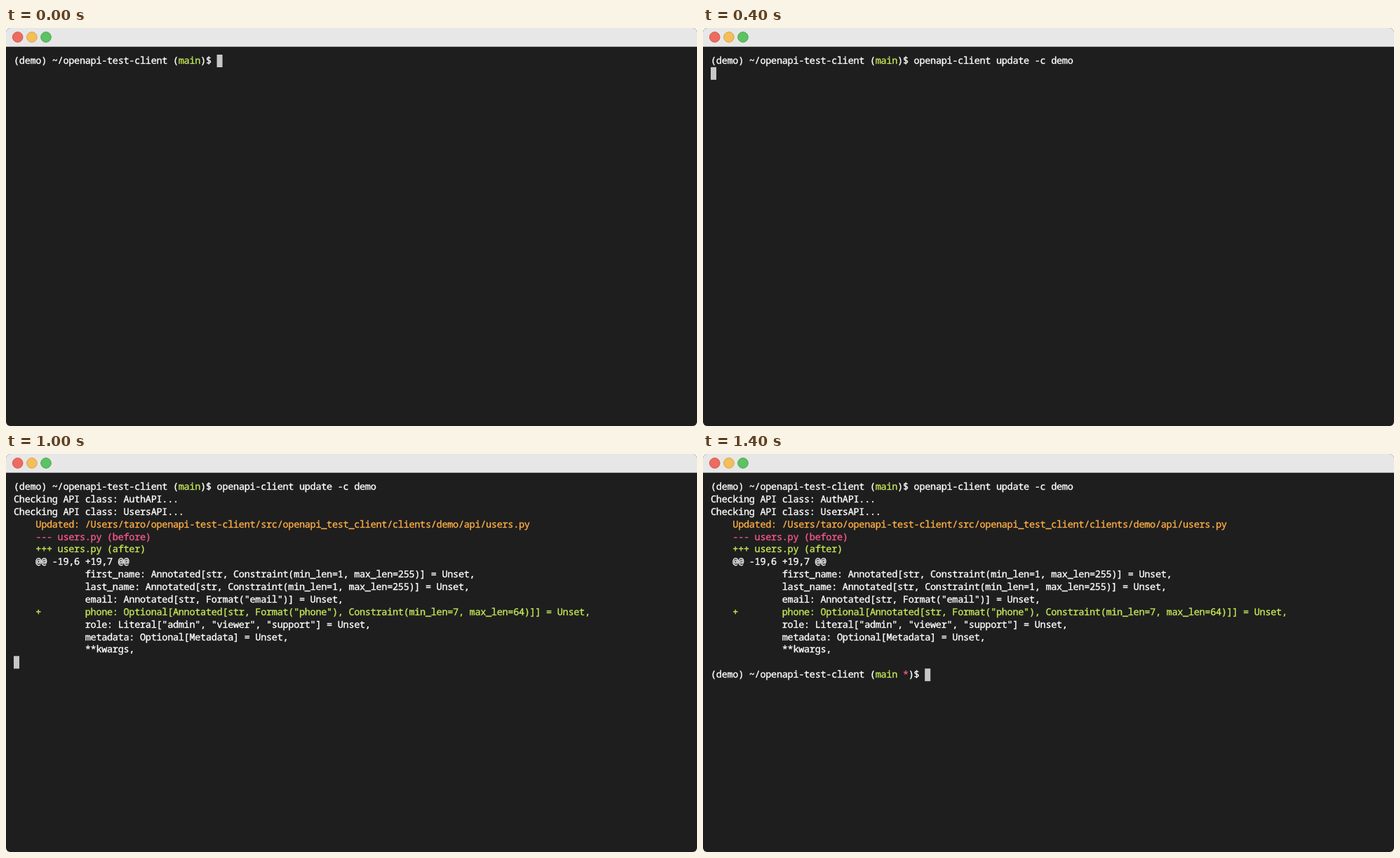
An HTML page that plays this animation: 985 by 568 pixels, repeating every 2000 ms.

```html
<!DOCTYPE html>
<html lang="en">
<head>
<meta charset="utf-8">
<title>Terminal</title>
<style>
  html, body { margin: 0; width: 100%; height: 100%; overflow: hidden; background: #fff; }
  #win { position: relative; width: 985px; height: 568px; overflow: hidden; background: #1e1e1e; border-radius: 6px; }
  #bar { height: 26px; background: #e7e7e7; border-bottom: 1px solid #b0b0b0; }
  #bar svg { display: block; }
  #text {
    position: absolute; left: 11px; top: 38px; margin: 0; color: #fff;
    font: 13.5px/17.88px "Noto Sans Mono", "DejaVu Sans Mono", monospace;
    letter-spacing: -.274px; -webkit-text-stroke: .35px;
    text-rendering: geometricPrecision; font-variant-ligatures: none;
  }
  #cursor { position: absolute; left: 11.2px; top: 38.2px; width: 7.8px; height: 17.8px; background: #c7c7c7; }
  .green { color: #c5ea58; }
  .orange { color: #ffaf46; }
  .pink { color: #f9568f; }
</style>
</head>
<body>
<div id="win">
  <div id="bar">
    <svg width="80" height="26">
      <circle cx="16.7" cy="13" r="7.3" fill="#ed6b60" stroke="#d1544b"/>
      <circle cx="36.9" cy="13" r="7.3" fill="#f5be5c" stroke="#d8a145"/>
      <circle cx="57" cy="13" r="7.3" fill="#5dc264" stroke="#48a64e"/>
    </svg>
  </div>
  <div id="cursor"></div>
  <pre id="text"></pre>
</div>
<script>
const STEP = 200, LOOP = 2000, CELL = 7.826, ROW = 17.88;
const text = document.getElementById('text');
const cursor = document.getElementById('cursor');

const paint = (color, s) => `<span class="${color}">${s}</span>`;
const prompt = mark => `(demo) ~/openapi-test-client (${paint('green', 'main')}${mark})$ `;
const pad = ' '.repeat(13);

const diff = [
  paint('orange', '    Updated: /Users/taro/openapi-test-client/src/openapi_test_client/clients/demo/api/users.py'),
  paint('pink', '    --- users.py (before)'),
  paint('green', '    +++ users.py (after)'),
  '    @@ -19,6 +19,7 @@',
  pad + 'first_name: Annotated[str, Constraint(min_len=1, max_len=255)] = Unset,',
  pad + 'last_name: Annotated[str, Constraint(min_len=1, max_len=255)] = Unset,',
  pad + 'email: Annotated[str, Format("email")] = Unset,',
  paint('green', '    +        phone: Optional[Annotated[str, Format("phone"), Constraint(min_len=7, max_len=64)]] = Unset,'),
  pad + 'role: Literal["admin", "viewer", "support"] = Unset,',
  pad + 'metadata: Optional[Metadata] = Unset,',
  pad + '**kwargs,',
  ''
].join('\n');

// Each step appends one chunk of terminal output.
const chunks = [
  prompt(''),
  'openapi-client update -c demo',
  '\n',
  'Checking API class: AuthAPI...\n',
  'Checking API class: UsersAPI...\n',
  diff,
  '\n',
  prompt(' ' + paint('pink', '*'))
];

let shown = -1;
function draw(now) {
  const step = Math.min(Math.floor(now % LOOP / STEP), chunks.length - 1);
  if (step !== shown) {
    shown = step;
    text.innerHTML = chunks.slice(0, step + 1).join('');
    const lines = text.textContent.split('\n');
    const row = lines.length - 1, col = lines[row].length;
    cursor.style.transform = `translate(${col * CELL}px, ${row * ROW}px)`;
  }
}

const start = performance.now();
function tick() {
  draw(performance.now() - start);
  requestAnimationFrame(tick);
}
tick();
</script>
</body>
</html>
```
